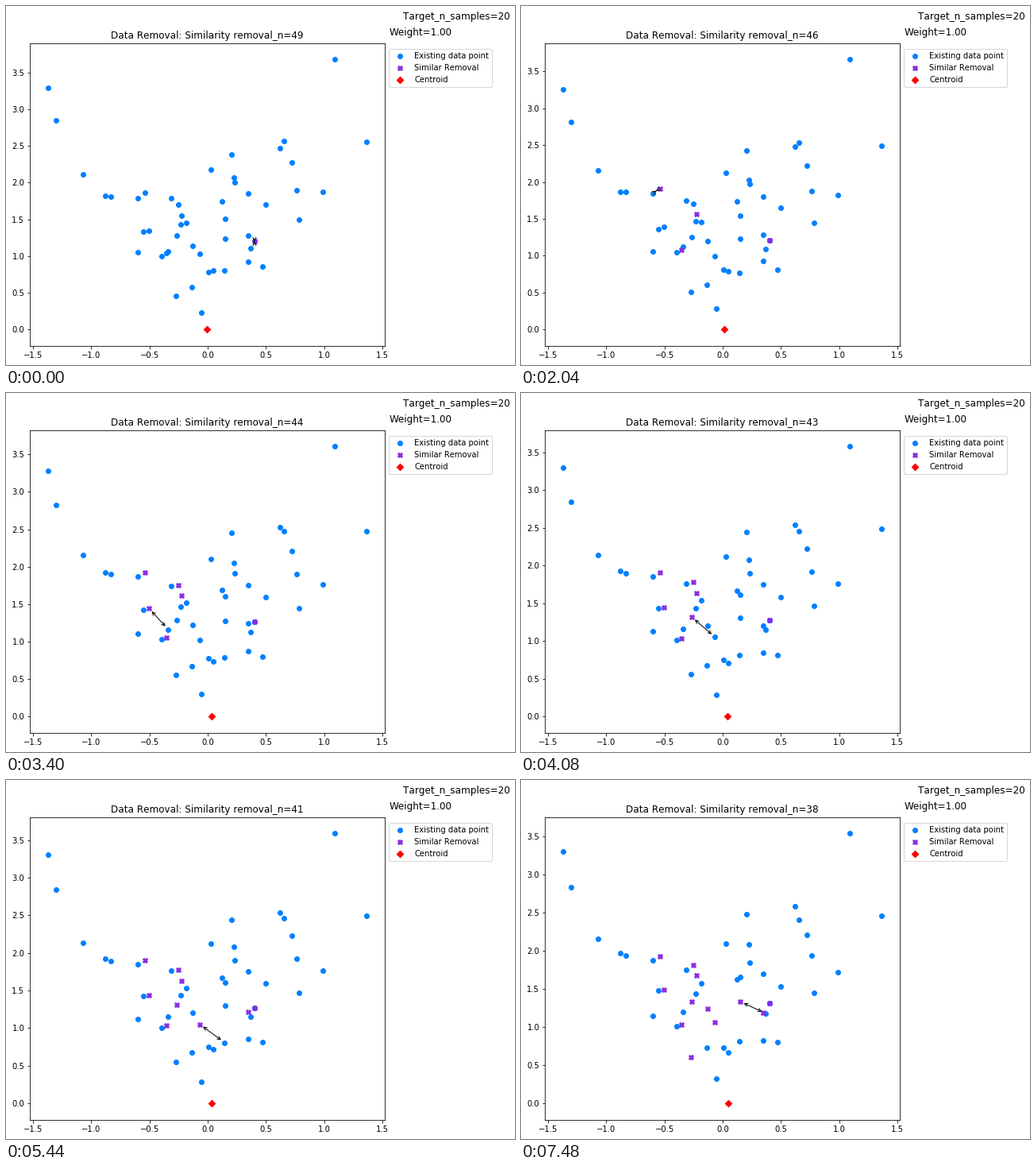
A matplotlib script for the animation above (8000 ms loop, 641x452 px).

```python
import numpy as np
import matplotlib.pyplot as plt
from matplotlib.animation import FuncAnimation
from matplotlib.ticker import MultipleLocator

W, H, DPI = 641, 452, 72
INTERVAL, FRAMES, HOLD = 40, 200, 17
plt.rcParams.update({"font.family": "DejaVu Sans", "text.kerning_factor": 6})

# (x, distance to centroid), listed in order of bearing around the x axis
POINTS = [
    (0.027, 2.172), (1.363, 2.551), (0.722, 2.280), (-0.315, 1.788), (0.470, 0.861),
    (-1.300, 2.844), (0.784, 1.495), (-1.367, 3.288), (0.143, 0.807), (0.225, 2.069),
    (-0.068, 1.024), (-0.266, 1.273), (0.763, 1.901), (-0.600, 1.056), (0.368, 1.110),
    (0.150, 1.240), (-0.250, 1.700), (-0.184, 1.452), (-0.222, 1.544), (0.620, 2.465),
    (0.402, 1.197), (-0.550, 1.327), (-0.136, 0.569), (0.150, 1.511), (-0.880, 1.820),
    (-0.272, 0.450), (-0.504, 1.338), (-0.340, 1.062), (-0.830, 1.804), (0.204, 2.378),
    (-0.130, 1.138), (-0.600, 1.788), (-0.540, 1.858), (-0.053, 0.233), (-1.068, 2.107),
    (-0.233, 1.430), (-0.395, 1.002), (-0.353, 1.040), (0.006, 0.785), (0.348, 1.273),
    (0.348, 0.926), (0.123, 1.744), (1.090, 3.678), (0.048, 0.802), (0.232, 2.000),
    (0.654, 2.568), (0.500, 1.696), (0.988, 1.869), (0.348, 1.853),
]
DROPS = [20, 18, 37, 32, 16, 26, 11, 39, 10, 30, 25, 15]

# Place the points in 3-D, so that distances follow the moving centroid
x, dist = np.array(POINTS).T
start = np.array([np.delete(np.append(x, x[DROPS[0]]), DROPS[0]).mean(), 0, 0])
angle = np.radians(-80 + 320 * np.linspace(0, 1, len(x))**1.3)
radius = np.sqrt(dist**2 - (x - start[0])**2)
pos = np.column_stack([x, radius * np.cos(angle), radius * np.sin(angle)])
pos = np.vstack([pos, pos[DROPS[0]]])  # the first dropped point has a twin
n_start = len(pos) - 1

# The centroid moves away from every dropped point
centers = [start]
for i, drop in enumerate(DROPS[1:], 1):
    c = centers[-1]
    centers.append(c + (c - pos[drop]) / (n_start - i))

fig = plt.figure(figsize=(W / DPI, H / DPI), dpi=DPI, facecolor="white")
ax = fig.add_axes([30.3 / W, 24.1 / H, 446.4 / W, 380.5 / H])
ax.set_xlim(-1.5249, 1.5181)
ax.xaxis.set_major_locator(MultipleLocator(0.5))
ax.yaxis.set_major_locator(MultipleLocator(0.5))

existing = ax.scatter([], [], color="#0080ff", marker="o", label="Existing data point")
removed = ax.scatter([], [], color="blueviolet", marker="X", label="Similar Removal")
centroid = ax.scatter([], [], color="red", marker="D", label="Centroid")
link = ax.annotate("", xy=(0, 0), xytext=(1, 1),
                   arrowprops=dict(arrowstyle="<->", shrinkA=5, shrinkB=5))
title = ax.set_title("", fontsize=12)
ax.legend(loc="upper left", bbox_to_anchor=(482.3 / W, 1 - 54 / H),
          bbox_transform=fig.transFigure, borderaxespad=0, fontsize=10)
fig.text(500 / W, 1 - 17 / H, "Target_n_samples=20", fontsize=12)
fig.text(482.6 / W, 1 - 37 / H, "Weight=1.00", fontsize=12)


def update(frame):
    step = frame // HOLD
    gone = DROPS[:step + 1]
    kept = np.delete(np.arange(len(pos)), gone)
    y = np.linalg.norm(pos - centers[step], axis=1)
    pts = np.column_stack([pos[:, 0], y])
    existing.set_offsets(pts[kept])
    removed.set_offsets(pts[gone])
    centroid.set_offsets([[centers[step][0], 0]])

    # Link the newly dropped point to its nearest neighbour
    last = gone[-1]
    near = kept[np.linalg.norm(pos[kept] - pos[last], axis=1).argmin()]
    link.set_position(tuple(pts[last]))
    link.xy = (pts[near, 0], pts[near, 1] + 1e-3)

    top = y.max()
    ax.set_ylim(-0.0615 * top, 1.059 * top)
    title.set_text(f"Data Removal: Similarity removal_n={n_start - step}")
    return existing, removed, centroid, link, title


anim = FuncAnimation(fig, update, frames=FRAMES, interval=INTERVAL,
                     repeat=True, repeat_delay=0, blit=False)
plt.show()
```
